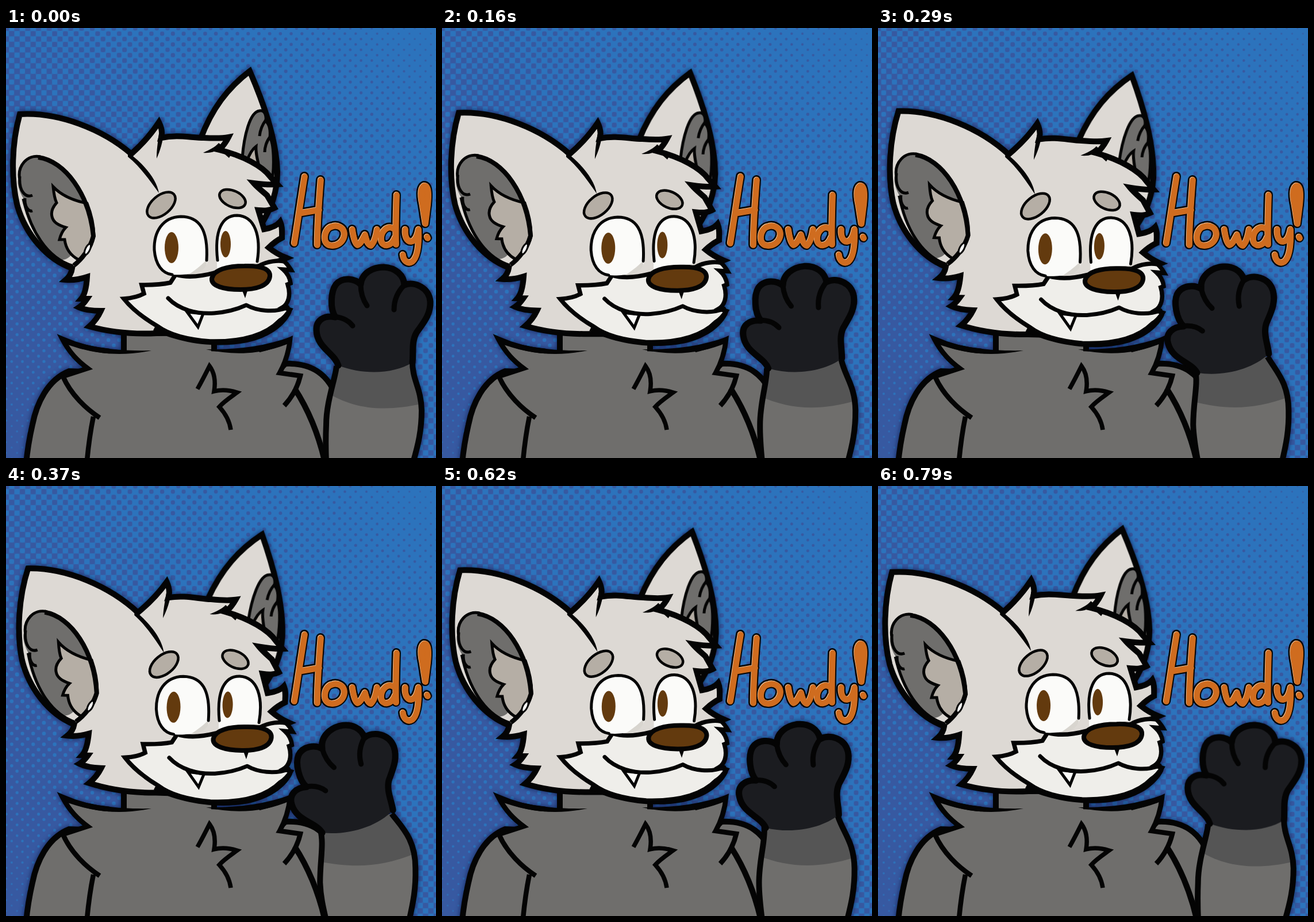
An HTML page with a canvas that plays this animation: 748 by 748 pixels, repeating every 0.83 s.

```html
<!DOCTYPE html>
<html lang="en">
<head>
<meta charset="utf-8">
<title>Howdy</title>
<style>
  html, body { margin: 0; width: 100%; height: 100%; overflow: hidden; background: #2c73bc; }
  canvas, svg { position: absolute; left: 0; top: 0; width: 748px; height: 748px; display: block; }
  #figure { filter: drop-shadow(0 0 5px rgba(8, 20, 66, .8)); }
  .o { stroke: #040404; stroke-width: 10; stroke-miterlimit: 5; }
  .m { stroke-width: 7.5; }
  .t { stroke-width: 5; }
  .r { stroke-linecap: round; stroke-linejoin: round; }
  .n { fill: none; }
  .k { fill: #040404; }
  .fur { fill: #ddd9d4; }
  .grey { fill: #6f6e6c; }
  .tan { fill: #b5aea5; }
  .snow { fill: #efeeea; }
  .white { fill: #fbfbf9; }
  .brown { fill: #633a0e; }
  .paw { fill: #1b1c20; }
  .word { fill: none; stroke-linecap: round; stroke-linejoin: round; }
</style>
</head>
<body>
<canvas id="dots" width="748" height="748"></canvas>
<svg viewBox="0 0 748 748">
  <defs>
    <clipPath id="armClip"><path id="armShape"/></clipPath>
    <g id="letters">
      <path d="M519 258 C512 300 507 338 501 374 M547 264 C544 302 541 340 541 377 M509 322 L544 316"/>
      <path d="M566 345 C552 348 548 378 566 378 C587 379 595 353 581 346 C576 343 571 343 566 345Z"/>
      <path d="M602 350 C604 364 607 375 611 377 C617 375 620 366 624 359 C626 367 629 377 634 378 C640 373 643 362 645 350"/>
      <path d="M676 350 C664 340 651 353 652 368 C654 382 670 380 676 364 M679 290 C678 320 677 350 678 376"/>
      <path d="M694 350 C693 362 697 371 704 371 C711 370 715 360 717 350 C718 375 716 398 706 406 C698 411 691 404 690 394"/>
      <path d="M727 274 C721 277 720 290 724 308 L729 340 L733 308 C735 289 735 274 727 274Z" fill="currentColor"/>
      <path d="M732 363 L733 365"/>
    </g>
  </defs>

  <g id="figure">
    <!-- right ear -->
    <g id="ear">
      <path class="o fur" d="M338 194 C358 140 386 104 424 75 C446 126 470 190 472 250 C472 285 462 312 445 340 L400 260Z"/>
      <path class="o t grey" d="M411 226 C414 188 424 146 441 144 C450 142 453 152 452 162 C459 168 460 180 459 191 C466 200 467 240 463 264 L438 244Z"/>
      <path class="o t n" d="M452 160 C446 168 442 178 441 188 M459 190 C453 197 450 208 450 216"/>
      <path class="o t tan" d="M419 232 C423 220 428 211 435 206 C434 218 438 232 442 248Z"/>
    </g>

    <!-- body -->
    <path class="o grey" d="M486 584 C530 582 562 600 578 650 L560 760 H470 V600Z"/>
    <path class="o grey" d="M110 597 C72 612 53 654 46 690 C40 716 37 736 35 758 H200 V600Z"/>
    <path class="o grey" d="M205 525 V580 H362 V525"/>
    <path class="grey" d="M96 541 C150 562 200 562 250 562 H350 C400 565 450 560 495 541 L488 572 L475 600 L514 604 L500 628 L553 748 H141 L151 676 L162 678 L99 606 L143 591 L122 572Z"/>
    <path class="o n" style="stroke-width:8.5" d="M180 562 C150 560 125 553 98 541 C111 566 126 580 142 592 L99 606 C113 638 140 663 163 678 M152 676 Q145 710 141 752"/>
    <path class="k" d="M97 538 C150 558 200 562 253 561 C200 572 150 568 97 547Z"/>
    <path class="k" d="M496 537 C450 554 400 560 348 559 C400 571 450 567 496 547Z"/>
    <path class="o n" style="stroke-width:8.5" d="M440 560 Q470 553 494 542 C492 562 486 582 476 600 L512 605 C507 626 497 643 484 657"/>
    <path class="o n" d="M502 627 C526 664 543 705 554 752"/>
    <path class="o m n" d="M333 628 C341 614 348 600 354 588 C363 600 365 614 362 632 C377 628 389 630 402 634 C391 642 380 649 371 659 C382 671 389 684 391 699"/>

    <!-- head -->
    <g id="head">
      <path class="o fur" d="M24 150 C92 146 168 176 218 219 C236 203 253 184 266 164 C271 174 272 184 270 191
        C298 185 322 191 344 191 C362 192 376 192 387 190 C383 198 378 205 371 212 C412 222 446 240 460 259 L472 272
        C458 273 446 272 431 270 C438 278 446 284 454 291 L467 313 C458 318 450 318 439 317 L449 350
        C461 348 471 344 477 337 C481 346 480 354 480 365 C472 369 465 374 457 382 C468 391 478 396 488 400
        L476 405 L480 470 L400 530 L262 531 C220 533 180 529 145 519 C154 511 160 503 165 492 C149 492 138 491 127 486
        C133 482 137 477 141 471 L131 471 C137 464 140 450 141 433 C126 438 115 439 104 438 C111 432 114 426 115 418
        C70 402 34 358 20 310 C8 262 10 200 24 150Z"/>
      <path class="k" d="M212 216 C238 235 262 262 266 287 C248 262 232 240 212 224Z"/>
      <path class="k" d="M275 178 C273 198 268 214 262 227 C262 212 264 200 266 184Z"/>
      <path class="k" d="M376 205 C367 215 356 218 343 217 C354 212 364 207 370 200Z M366 207 L392 219 L388 226Z"/>

      <!-- left ear, inside -->
      <path class="grey" d="M60 224 C103 231 145 290 153 362 C146 385 131 403 117 414 C70 398 38 345 30 296 C20 280 18 262 24 258 C18 236 40 221 60 224Z"/>
      <path class="fur" d="M92 404 C103 404 110 400 114 394 L131 398 L116 414Z"/>
      <path class="o t tan" d="M82 276 C96 291 116 300 141 305 C150 328 153 348 153 362 C149 384 137 398 126 403 C113 396 104 384 102 368 L93 368 C95 360 99 352 104 347 C91 343 82 338 80 328 C78 320 80 313 88 304 C84 296 83 286 82 276Z"/>
      <path class="o t n" d="M117 414 C70 400 42 350 30 297 M60 224 C37 219 19 240 24 264 M24 258 C22 284 34 296 46 291 M33 296 C32 312 40 320 46 318"/>
      <path class="o n" style="stroke-width:8" d="M56 225 C103 231 145 290 152 362 C146 385 131 403 118 413"/>
      <ellipse class="o white" style="stroke-width:3" cx="142" cy="385" rx="4" ry="10" transform="rotate(25 142 385)"/>
    </g>

    <!-- face -->
    <g id="face">
      <path class="o m snow" d="M295 429 C316 435 340 432 362 426 L440 414 C455 405 474 404 484 406 C490 411 493 416 496 421 L482 420
        C490 427 494 436 495 444 L490 446 C496 465 491 480 481 486 L494 490 C488 499 483 505 476 509
        C450 536 405 546 355 545 C315 542 283 533 264 519 C240 505 220 490 205 471
        C218 470 229 468 240 462 L236 447 C256 447 272 446 286 443Z"/>
      <path class="k" d="M262 514 C300 541 365 552 420 541 C455 533 480 513 498 489 L496 496 C482 523 452 540 420 547 C360 559 296 546 256 526Z"/>
      <path class="white" d="M350 409 C352 350 336 327 304 327 C272 328 257 355 258 386 C260 412 272 427 290 429 C312 431 342 425 350 409Z"/>
      <path fill="#d8d5cf" d="M319 428 C332 419 342 411 350 402 L349 410 C346 421 333 428 319 428Z"/>
      <path class="o t n r" d="M349 404 C352 350 336 328 304 328 C272 329 257 355 258 386 C260 412 272 427 289 429"/>
      <path class="white" d="M367 405 C364 352 376 325 402 325 C432 326 444 360 438 408 L367 418Z"/>
      <path class="o t n r" d="M368 404 C362 352 376 326 402 326 C433 327 444 362 437 406"/>
      <ellipse class="brown" cx="288" cy="382" rx="12" ry="27"/>
      <ellipse class="brown" cx="382" cy="376" rx="9" ry="23"/>
      <ellipse class="o tan" style="stroke-width:4.5" cx="270" cy="308" rx="29" ry="16.5" transform="rotate(-40 270 308)"/>
      <ellipse class="o tan" style="stroke-width:4.5" cx="394" cy="297" rx="24" ry="14" transform="rotate(24 394 297)"/>
      <path class="o brown" style="stroke-width:8" d="M358 436 C361 420 386 414 415 414 C446 413 460 420 459 432 C457 449 434 455 408 455 C379 455 357 449 358 436Z"/>
      <path class="k" d="M411 457 H420 L416 470Z"/>
      <path class="o t white" d="M315 494 L334 520 L343 497Z"/>
      <path class="o n r" style="stroke-width:7" d="M282 470 C301 490 332 498 362 496 C388 494 405 488 418 482 C436 492 466 496 490 486"/>
    </g>

    <!-- waving arm -->
    <g clip-path="url(#armClip)">
      <path class="grey" d="M500 540 H748 V748 H500Z"/>
      <path id="band" fill="#555"/>
    </g>
    <path id="armLine" class="o n"/>
    <g id="hand">
      <path class="paw" id="palm"/>
      <path class="o n r" style="stroke-width:11" id="palmLine"/>
      <path class="o n r" style="stroke-width:9" d="M560 502 C580 501 594 506 603 518 M617 446 C617 460 621 473 628 483 M693 447 C682 458 675 471 675 490"/>
    </g>
  </g>

  <g class="word" role="img" aria-label="Howdy!">
    <use href="#letters" stroke="#080604" stroke-width="16" color="#080604"/>
    <use href="#letters" stroke="#f3cba4" stroke-width="10.5" color="#f3cba4"/>
    <use href="#letters" stroke="#cf6c1f" stroke-width="10.3" color="#cf6c1f" transform="translate(.7 .7)"/>
  </g>
</svg>

<script>
const SIZE = 748, LOOP = 830, STEPS = 20;
const el = id => document.getElementById(id);

// Halftone: dots swell into a checkerboard along the diagonal, then invert.
function drawDots() {
  const ctx = el('dots').getContext('2d');
  const img = ctx.createImageData(SIZE, SIZE);
  const light = [44, 115, 188], dark = [55, 89, 161], cell = SIZE / 80;
  for (let y = 0, i = 0; y < SIZE; y++) {
    for (let x = 0; x < SIZE; x++, i += 4) {
      const wave = Math.cos(Math.PI * x / cell) * Math.cos(Math.PI * y / cell);
      const edge = 0.96 * (x - y) / SIZE;
      const a = Math.min(1, Math.max(0, (wave - edge) * 3 + 0.5));
      for (let c = 0; c < 3; c++) img.data[i + c] = light[c] + (dark[c] - light[c]) * a;
      img.data[i + 3] = 255;
    }
  }
  ctx.putImageData(img, 0, 0);
}

// Blend two paths that share the same commands.
function mix(a, b, p) {
  const to = b.match(/\d+/g);
  let i = 0;
  return a.replace(/\d+/g, v => (+v + (to[i++] - v) * p).toFixed(2));
}

const left = ['575 588 C573 610 557 650 557 690 C556 710 556 730 557 756',
              '546 598 C553 622 546 650 546 690 C547 715 552 735 557 756'];
const right = ['707 578 C706 612 722 625 723 665 C723 700 717 725 708 756',
               '670 570 C690 595 712 615 712 665 C713 700 708 725 701 756'];
const rightUp = ['708 756 C717 725 723 700 723 665 C722 625 706 612 707 578',
                 '701 756 C708 725 713 700 712 665 C712 615 690 595 670 570'];
const band = ['M540 560 L550 628 C600 664 660 670 735 651 L740 560Z',
              'M540 560 L535 652 C600 665 655 666 725 633 L740 560Z'];

const palm = 'M578 587 C572 566 541 556 540 526 C539 508 554 499 573 503 C563 488 565 458 574 446 ' +
  'C586 432 607 436 617 446 C619 426 638 416 657 416 C678 417 692 430 693 447 ' +
  'C711 440 736 452 738 476 C739 499 725 514 714 530 C705 546 709 565 707 582';
el('palmLine').setAttribute('d', palm);
el('palm').setAttribute('d', palm + ' C674 602 622 604 578 587Z');

const turn = (id, deg, x, y, pre = '') =>
  el(id).setAttribute('transform', `${pre}rotate(${deg} ${x} ${y})`);

function pose(p) {
  const headTurn = `rotate(${2.35 * p} 198 505) `;
  turn('head', 2.35 * p, 198, 505);
  turn('ear', 1.9 * p, 430, 210, headTurn);
  turn('face', 1.05 * p, 130, 580);
  turn('hand', -15.9 * p, 628, 665, `translate(${-9 * p} 0) `);
  const l = mix(...left, p);
  el('armLine').setAttribute('d', `M${l} M${mix(...right, p)}`);
  el('armShape').setAttribute('d', `M${l} L${mix(...rightUp, p)}Z`);
  el('band').setAttribute('d', mix(...band, p));
}

// 24 steps a second, each start cut to a whole 10 ms.
function stepAt(t) {
  let k = STEPS - 1;
  while (Math.floor(k * 25 / 6) * 10 > t) k--;
  return k;
}

const start = performance.now();
let shown = -1;
function tick() {
  const k = stepAt((performance.now() - start) % LOOP);
  if (k !== shown) {
    shown = k;
    pose((1 - Math.cos(2 * Math.PI * k / STEPS)) / 2);
  }
  requestAnimationFrame(tick);
}

drawDots();
tick();
</script>
</body>
</html>
```
